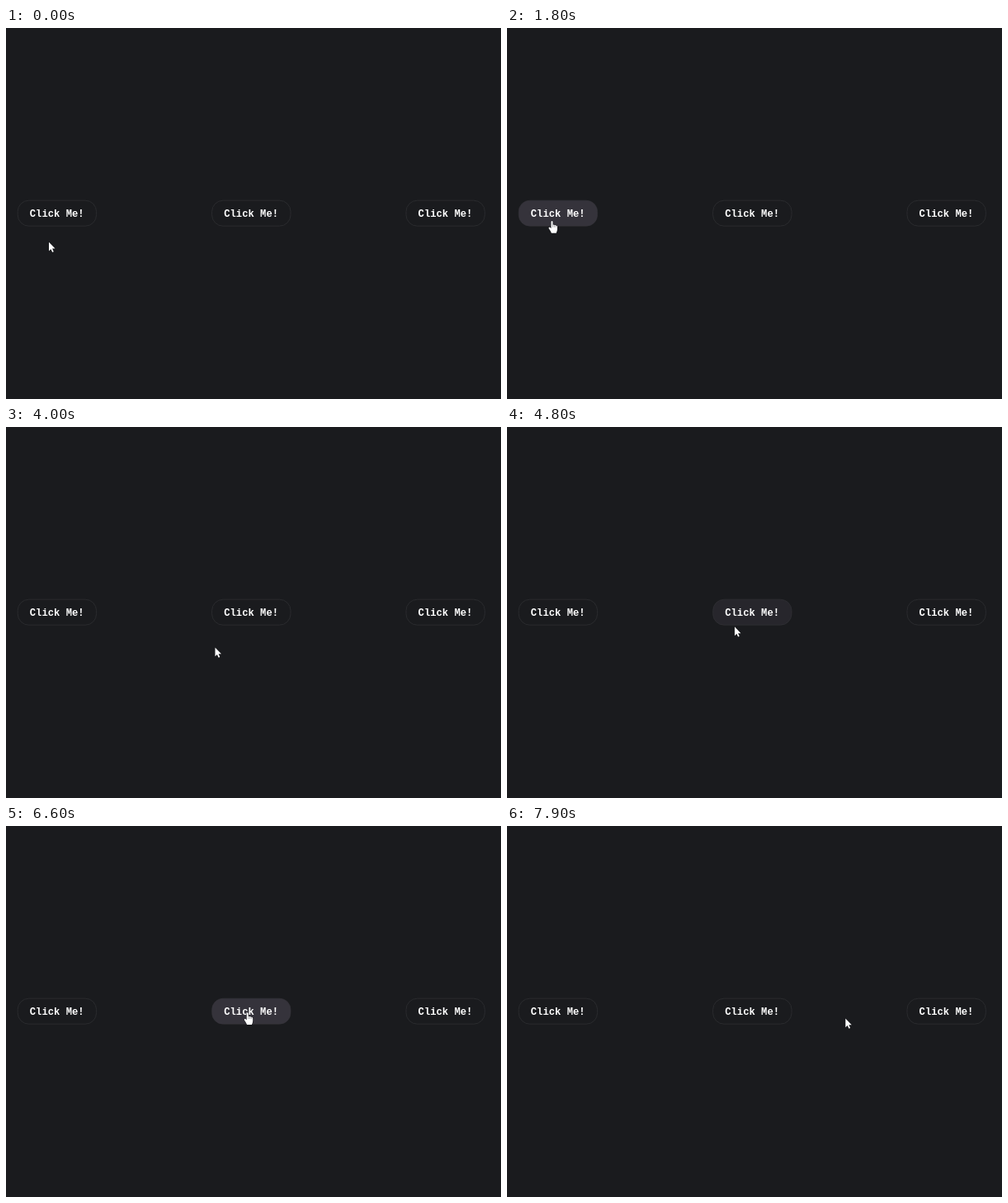
Animation, 600 px wide and 450 px high, one loop 8 s. Source, as an HTML page:

```html
<!DOCTYPE html>
<html lang="en">
<head>
<meta charset="utf-8">
<style>
  html, body { margin: 0; width: 100%; height: 100%; overflow: hidden; background: #1a1b1e; }
  svg { display: block; width: 600px; height: 450px; }
  rect { fill: #1a1b1e; stroke: #2a2b2e; }
  rect.hover, rect.press { stroke: none; }
  rect.hover { fill: #35333b; }
  rect.press { fill: #44424b; }
  text { font: bold 12.2px "Liberation Mono", monospace; fill: #fff; }
  #cursor path { fill: #fff; stroke: #141518; stroke-width: .8; paint-order: stroke; stroke-linejoin: round; }
  #hand .gaps { stroke: #55545b; stroke-width: .5; }
</style>
</head>
<body>
<svg viewBox="0 0 600 450">
  <g id="buttons"></g>
  <g id="cursor">
    <path id="arrow" d="M0 0V10.8L2.4 8.5L4.2 12.2L5.8 11.5L4.1 7.8H7.5Z"/>
    <g id="hand">
      <path d="M-1 1Q0 -.6 1 1V5.2Q2.3 4.3 3 5.5Q4.3 4.7 4.9 6.1Q6.4 5.6 6.5 7.4V10.5Q6.4 12.5 5.2 15H-.6Q-1.5 12.7 -3.8 9.6Q-4.4 8.2 -3.2 7.8Q-2.2 7.8 -1 9.3Z"/>
      <path class="gaps" d="M1.1 5.3V8M3 5.6V8M4.9 6.2V8"/>
    </g>
  </g>
</svg>
<script>
const DURATION = 8000, STEP = 100;
const BUTTON_WIDTH = 95.4, BUTTON_GAP = 235.4;

// The pointer visits the first two buttons and clicks at a steady pace.
const visits = [
  { enter: 500, leave: 3200, firstClick: 1300, every: 600, hold: 150, clicks: 3 },
  { enter: 4700, leave: 7700, firstClick: 5800, every: 1000, hold: 500, clicks: 2 }
];

const byId = id => document.getElementById(id);

const buttons = [0, 1, 2].map(i => {
  const x = 14.2 + i * BUTTON_GAP;
  const shape = kind => `<rect class="${kind}" x="${x}" y="209.2" width="${BUTTON_WIDTH}" height="31" rx="13.5"/>`;
  byId("buttons").innerHTML +=
    `<g>${shape("idle")}${shape("hover")}${shape("press")}<text x="${x + 14.6}" y="229">Click Me!</text></g>`;
  return { x, visit: visits[i] };
});

// Eased progress from 0 to 1 between two times
function ramp(time, start, end) {
  const p = Math.min(1, Math.max(0, (time - start) / (end - start)));
  return p * p * (3 - 2 * p);
}

const pulse = (time, on, off, fade) => ramp(time, on, on + fade) * (1 - ramp(time, off, off + fade));

function pressLevel(time, { firstClick, every, hold, clicks }) {
  const since = time - firstClick;
  if (since < 0 || since >= every * clicks) return 0;
  return pulse(since % every, 0, hold, 250);
}

function pointerAt(time) {
  const arrive = ramp(time, 0, 900), leave = ramp(time, 3100, 4000);
  const climb = ramp(time, 4000, 5400), exit = ramp(time, 7700, 7900);
  const dip = Math.sin(Math.PI * Math.min(1, Math.max(0, (time - 4000) / 800)));
  return {
    x: 52 + 2.5 * arrive + 199 * leave + 37 * climb + 2.2 * ramp(time, 5400, 5800) + 117.6 * exit,
    y: 259.7 - 26 * arrive + 33.8 * leave + 18 * dip - 41.5 * climb + 7.5 * exit
  };
}

function draw(time) {
  const { x, y } = pointerAt(time);
  const overButton = y < 240.5 && buttons.some(b => x > b.x && x < b.x + BUTTON_WIDTH);
  byId("cursor").setAttribute("transform", `translate(${x} ${y})`);
  byId("arrow").style.display = overButton ? "none" : "";
  byId("hand").style.display = overButton ? "" : "none";

  buttons.forEach(({ visit }, i) => {
    const [, hover, press] = byId("buttons").children[i].children;
    hover.style.opacity = visit ? pulse(time, visit.enter, visit.leave, 200) : 0;
    press.style.opacity = visit ? pressLevel(time, visit) : 0;
  });
}

const start = performance.now();
function tick() {
  const elapsed = (performance.now() - start) % DURATION;
  draw(Math.floor(elapsed / STEP) * STEP);
  requestAnimationFrame(tick);
}
tick();
</script>
</body>
</html>
```
